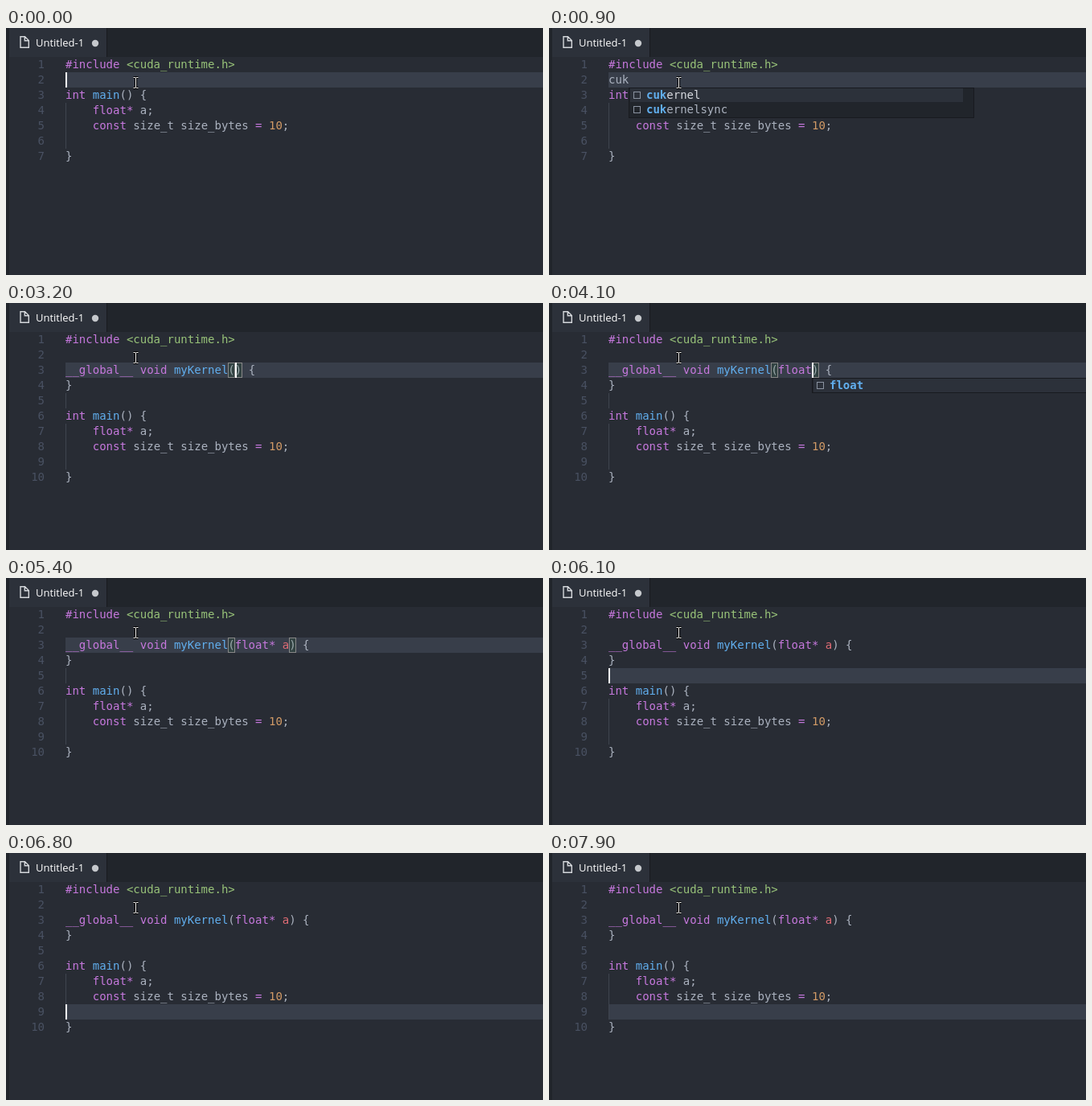
Write an HTML page that moves like this. It is 668 px wide and 307 px high and loops after 8 s.

```html
<!DOCTYPE html>
<html lang="en">
<head>
<meta charset="utf-8">
<title>Code editor</title>
<style>
  html, body { margin: 0; width: 100%; height: 100%; overflow: hidden; background: #282c34; }
  #stage { position: relative; width: 668px; height: 307px; overflow: hidden; background: #282c34;
    font: 14px/19px "DejaVu Sans Mono", monospace; color: #abb2bf; }
  #stage div, #stage svg { position: absolute; white-space: pre; }
  #code, #stage svg { left: 0; top: 0; width: 668px; height: 307px; }
  .side { left: 0; top: 0; width: 4px; height: 307px; background: #21252b; }
  .bar { left: 4px; top: 0; width: 664px; height: 36px; background: #21252b; }
  .tab { left: 4px; top: 0; width: 121px; height: 36px; background: #2c313a; border-right: 1px solid #181a1f; }
  .title { left: 37px; top: 9px; font: 500 13px/19px "Open Sans", "Noto Sans", sans-serif; color: #fff; }
  .num { left: 4px; width: 44px; height: 19px; text-align: right; color: #495162; }
  .line { left: 74px; height: 19px; }
  .active { left: 74px; width: 594px; height: 19px; background: #383e4a; }
  .guide { left: 74px; width: 1px; height: 19px; background: #3f454f; }
  .select { height: 19px; background: #4c5361; }
  .match { box-sizing: border-box; height: 19px; border: 1px solid #888; background: rgba(0, 100, 0, .1); }
  .caret { width: 2px; height: 19px; background: #fff; }
  .popup { box-sizing: border-box; width: 430px; background: #21252b; border: 1px solid #181a1f; }
  .item { left: 1px; width: 414px; height: 17px; line-height: 17px; }
  .item.on { background: #2c313a; color: #d7dae0; }
  .item i { position: absolute; left: 4px; top: 4px; width: 9px; height: 9px; box-sizing: border-box; border: 1px solid #8b93a1; }
  .item b { color: #61afef; }
  .item span { position: absolute; left: 20px; }
  .key { color: #c678dd; }
  .str { color: #98c379; }
  .fn { color: #61afef; }
  .nr { color: #d19a66; }
  .arg { color: #e06c75; }
</style>
</head>
<body>
<div id="stage">
  <div class="side"></div>
  <div class="bar"></div>
  <div class="tab"></div>
  <div class="title">Untitled-1</div>
  <div id="code"></div>
  <svg viewBox="0 0 668 307" fill="none">
    <defs>
      <path id="beam" d="M158.500 61.500h2q1 0 1 1q0 -1 1 -1h2M161.500 62v12M158.500 74.500h2q1 0 1 -1q0 1 1 1h2"/>
    </defs>
    <path d="M18 10.700h5.500l4.800 4.800v8.800H18zM23.300 10.700v5h5" stroke="#d4d7db" stroke-width="1.400"/>
    <circle cx="111" cy="19" r="4.200" fill="#c5c8cc"/>
    <use href="#beam" stroke="#000" stroke-width="3"/>
    <use href="#beam" stroke="#fff"/>
  </svg>
</div>
<script>
const LOOP = 8000, ROW = 19, TOP = 36, LEFT = 74, CHAR = 14 * 1233 / 2048;
const code = document.getElementById("code");
const x = col => LEFT + col * CHAR;
const y = row => TOP + (row - 1) * ROW;

const steps = [];
let last = { typed: "", name: null, param: "", row: 2, col: 0, match: [], guide: true };
// Each step keeps the previous state, except for short-lived parts.
function at(time, change = {}) {
  last = { ...last, blink: false, popup: null, select: null, ...change, time };
  steps.push(last);
}

at(0);
["c", "cu", "cuk"].forEach((typed, i) => at(200 + i * 100, { typed, col: i + 1 }));
const list = ["cukernel", "cukernelsync"];
at(500, { popup: list, pick: 0 });
at(900, { popup: list, pick: 0, blink: true });
at(1200, { popup: list, pick: 1, blink: true });

const picked = { select: [3, 16, 22] };
at(1500, { name: "kernel", row: 3, col: 22, ...picked });
at(1900, { blink: true, ...picked });
[2200, 2300, 2500, 2600, 2700, 2800, 2900, 3000].forEach((time, i) => {
  const col = 17 + i;
  at(time, { name: "myKernel".slice(0, i + 1), col, match: [[3, col], [3, col + 1]] });
});
at(3200, { col: 25 });
[3700, 3800, 3900, 4000, 4100, 4500, 4800, 4900].forEach((time, i) => {
  const col = 26 + i;
  at(time, { param: "float* a".slice(0, i + 1), col, match: [[3, 24], [3, col]],
    popup: time === 4100 ? ["float"] : null, pick: 0 });
});
at(5400, { blink: true });
at(5600, { row: 4, col: 1, match: [[3, 35], [4, 0]], guide: false });
at(6100, { row: 5, col: 0, match: [] });
at(6300, { row: 6, col: 12, match: [[6, 11], [10, 0]] });
at(6400, { row: 7, col: 13 });
at(6500, { match: [] });
at(6600, { row: 8, col: 33 });
at(6800, { row: 9, col: 0 });
at(7200, { blink: true });
at(7400, { col: 4 });
at(7900, { blink: true });

function textOf(s) {
  const kernel = s.name === null ? [s.typed]
    : ["", `__global__ void ${s.name}(${s.param}) {`, "}", ""];
  return ["#include <cuda_runtime.h>", ...kernel, "int main() {", "    float* a;",
    "    const size_t size_bytes = 10;", "", "}"];
}

function add(parent, cls, style = {}, text = "") {
  const el = document.createElement("div");
  el.className = cls;
  for (const k in style) el.style[k] = style[k] + "px";
  el.textContent = text;
  parent.append(el);
  return el;
}

function span(parent, cls, text, tag = "span") {
  const el = document.createElement(tag);
  el.className = cls;
  el.textContent = text;
  parent.append(el);
  return el;
}

const TOKEN = /(?<key>#include|\b(?:__global__|void|int|float|const)\b|[*=])|(?<str><.*>)|(?<fn>\w+(?=\())|(?<arg>\w+(?=\)))|(?<nr>\b\d+\b)|\w+|\W/g;
function paint(el, text) {
  for (const m of text.matchAll(TOKEN)) {
    const cls = Object.keys(m.groups).find(k => m.groups[k]);
    if (cls) span(el, cls, m[0]); else el.append(m[0]);
  }
}

function drawPopup(s) {
  const box = add(code, "popup", { left: Math.round(x(s.col)), top: y(s.row + 1), height: s.popup.length * ROW });
  const hit = (s.name === null ? s.typed : s.param).length;
  s.popup.forEach((label, i) => {
    const item = add(box, i === s.pick ? "item on" : "item", { top: i * 18 });
    span(item, "", "", "i");
    const text = span(item, "", "");
    span(text, "", label.slice(0, hit), "b");
    text.append(label.slice(hit));
  });
}

function draw(s) {
  code.textContent = "";
  const lines = textOf(s), body = lines.length - 3;
  if (s.select) {
    const [row, from, to] = s.select;
    add(code, "select", { left: x(from), top: y(row), width: (to - from) * CHAR });
  } else add(code, "active", { top: y(s.row) });
  const guides = [body - 0, body + 1, body + 2].map(row => row - 0);
  if (s.name !== null && s.guide) guides.push(5);
  guides.forEach(row => add(code, "guide", { top: y(row) }));
  lines.forEach((text, i) => {
    add(code, "num", { top: y(i + 1) }, i + 1);
    paint(add(code, "line", { top: y(i + 1) }), text);
  });
  s.match.forEach(([row, col]) => add(code, "match", { left: x(col), top: y(row), width: CHAR + 0.5 }));
  if (!s.blink) add(code, "caret", { left: Math.round(x(s.col)), top: y(s.row) });
  if (s.popup) drawPopup(s);
}

let shown = null;
const start = performance.now();
function tick() {
  const time = (performance.now() - start) % LOOP;
  const step = steps.findLast(s => s.time <= time);
  if (step !== shown) draw(shown = step);
  requestAnimationFrame(tick);
}
tick();
</script>
</body>
</html>
```
